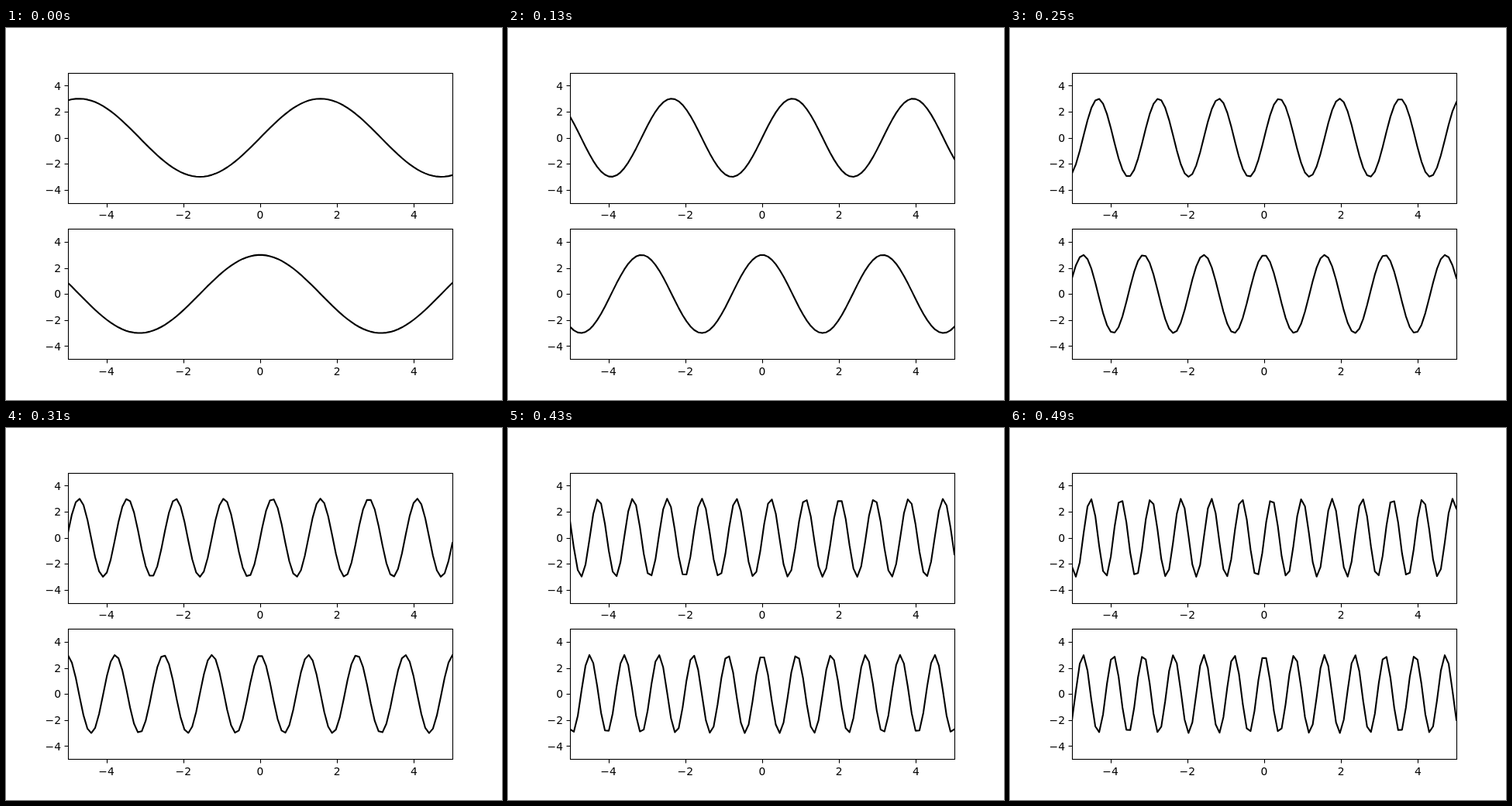
These frames come from a looping animation (640 px wide and 480 px high, 550 ms). An HTML page with a canvas:

```html
<!DOCTYPE html>
<html lang="en">
<head>
<meta charset="utf-8">
<title>Sine and cosine</title>
<style>
html, body { margin: 0; width: 100%; height: 100%; overflow: hidden; background: #fff; }
canvas { display: block; }
</style>
</head>
<body>
<canvas id="stage" width="640" height="480"></canvas>
<script>
const ctx = document.getElementById('stage').getContext('2d');
const LEFT = 80, WIDTH = 496, HEIGHT = 168, SAMPLES = 100;
const FIRST_HOLD = 130, STEP = 60, LOOP = 550;
const TICKS = [-4, -2, 0, 2, 4];
const plots = [{ top: 57.6, wave: Math.sin }, { top: 259.2, wave: Math.cos }];

const toX = x => LEFT + (x + 5) / 10 * WIDTH;
const toY = (y, top) => top + (5 - y) / 10 * HEIGHT;
const snap = v => Math.floor(v + 0.5) + 0.5;

function line(x1, y1, x2, y2) {
  ctx.beginPath();
  ctx.moveTo(x1, y1);
  ctx.lineTo(x2, y2);
  ctx.stroke();
}

function drawCurve({ top, wave }, frequency) {
  ctx.save();
  ctx.beginPath();
  ctx.rect(LEFT, Math.round(top), WIDTH, HEIGHT);
  ctx.clip();
  ctx.lineWidth = 1.5 * 100 / 72;
  ctx.lineJoin = 'round';
  ctx.lineCap = 'square';
  ctx.beginPath();
  for (let i = 0; i < SAMPLES; i++) {
    const x = -5 + 10 * i / (SAMPLES - 1);
    ctx.lineTo(toX(x), toY(3 * wave(frequency * x), top));
  }
  ctx.stroke();
  ctx.restore();
}

function drawAxes({ top }) {
  const left = snap(LEFT), bottom = snap(top + HEIGHT);
  ctx.lineWidth = 0.8 * 100 / 72;
  ctx.strokeRect(left, snap(top), WIDTH, bottom - snap(top));
  for (const tick of TICKS) {
    const x = toX(tick), y = toY(tick, top);
    const label = String(tick).replace('-', '\u2212');
    line(snap(x), bottom, snap(x), bottom + 5);
    line(left - 5, snap(y), left, snap(y));
    ctx.textAlign = 'center';
    ctx.fillText(label, x, Math.round(top + HEIGHT + 20.3));
    ctx.textAlign = 'right';
    ctx.fillText(label, 71, Math.round(y + 5.15));
  }
}

function draw(now) {
  const t = now % LOOP;
  const frequency = t < FIRST_HOLD ? 1 : 2 + Math.floor((t - FIRST_HOLD) / STEP);
  ctx.fillStyle = '#fff';
  ctx.fillRect(0, 0, 640, 480);
  ctx.fillStyle = ctx.strokeStyle = '#000';
  ctx.font = '13.89px "DejaVu Sans", sans-serif';
  for (const plot of plots) {
    drawCurve(plot, frequency);
    drawAxes(plot);
  }
}

const start = performance.now();
function animate() {
  draw(performance.now() - start);
  requestAnimationFrame(animate);
}
animate();
</script>
</body>
</html>
```
